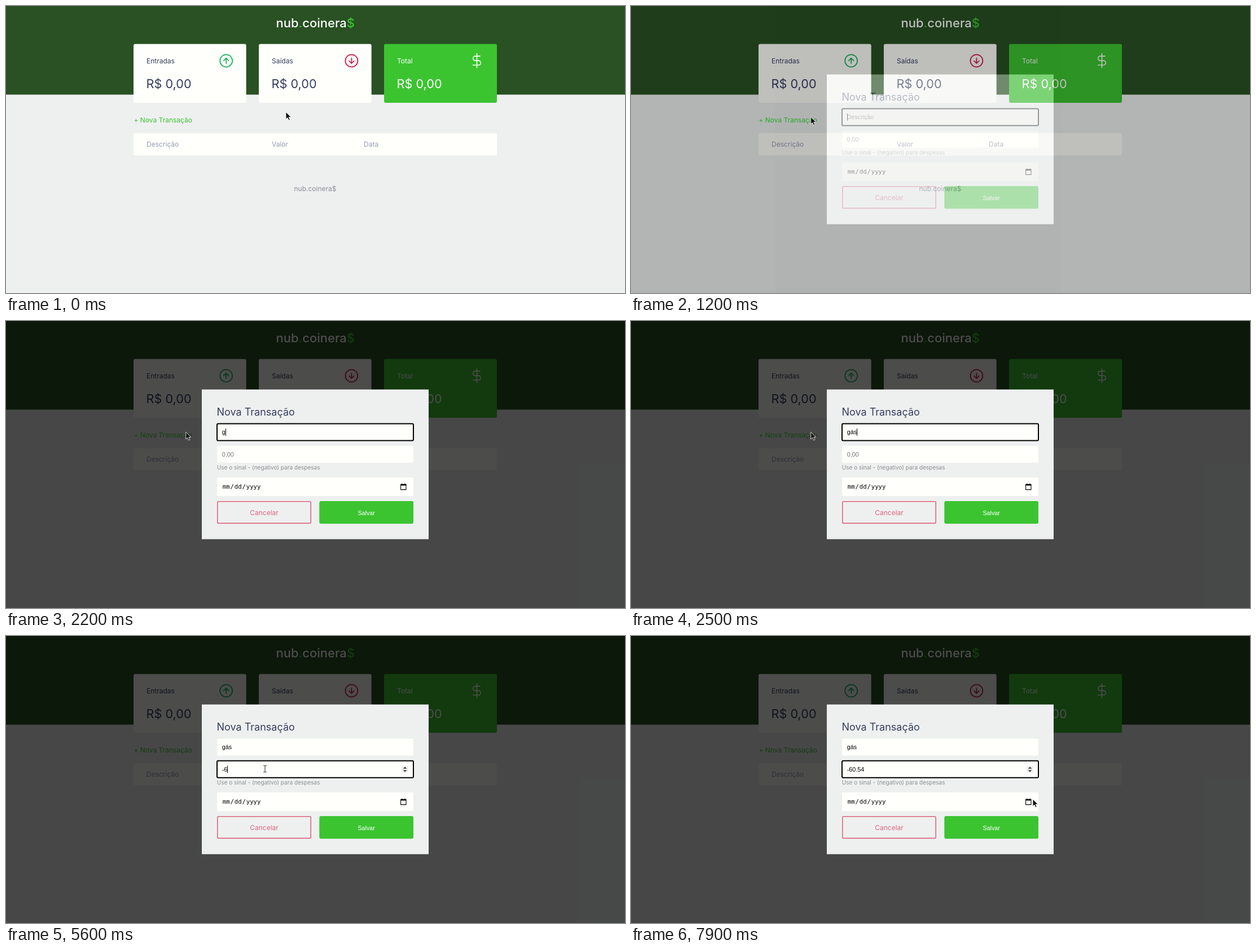
An HTML page that plays this animation: 1097 px wide and 510 px high, repeating every 8000 ms.

```html
<!DOCTYPE html>
<html lang="pt">
<head>
<meta charset="utf-8">
<title>Nova Transação</title>
<style>
  html, body { margin: 0; width: 100%; height: 100%; overflow: hidden; background: #eef0f0; }
  svg { display: block; width: 1097px; height: 510px; }
  text { font: 12px Inter, sans-serif; fill: #363f5f; white-space: pre; }
  .amount { font-size: 21.7px; }
  .brand { font-size: 22px; font-weight: 500; fill: #fff; }
  .brand tspan { fill: #3bc430; }
  .mid { text-anchor: middle; }
  .white { fill: #fff; }
  .grey { fill: #969cb3; }
  .title { font-size: 18px; }
  .help { font-size: 10.05px; fill: #8b9090; }
  .field { font: 10.73px "Liberation Sans", Arial, sans-serif; fill: #000; }
  .hint { fill: #757575; }
  .mono { font: 10.73px "DejaVu Sans Mono", monospace; fill: #000; }
  .card { fill: #fffffb; }
  .green { fill: #3bc430; }
  .line { fill: none; stroke-linecap: round; stroke-linejoin: round; }
</style>
</head>
<body>
<svg viewBox="0 0 1097 510" xmlns="http://www.w3.org/2000/svg">
  <rect width="1097" height="510" fill="#eef0f0"/>
  <rect width="1097" height="157.5" fill="#295123"/>
  <text class="brand mid" x="548.3" y="38">nub<tspan>.</tspan>coinera<tspan>$</tspan></text>

  <rect class="card" x="226" y="67.5" width="199.7" height="104.5" rx="3"/>
  <rect class="card" x="448" y="67.5" width="199.7" height="104.5" rx="3"/>
  <rect class="green" x="670" y="67.5" width="200" height="104.5" rx="3"/>
  <text x="249" y="101.5">Entradas</text>
  <text x="471" y="101.5">Saídas</text>
  <text class="white" x="693" y="101.5">Total</text>
  <text class="amount" x="248.5" y="146">R$ 0,00</text>
  <text class="amount" x="470.5" y="146">R$ 0,00</text>
  <text class="amount white" x="692.5" y="146">R$ 0,00</text>

  <g class="line" stroke-width="1.7">
    <g stroke="#16b45c" transform="translate(390.2 97.3)">
      <circle r="11"/><path d="M0 4.6V-4.6M-4.4-.2L0-4.6 4.4-.2"/>
    </g>
    <g stroke="#d0184b" transform="translate(612.4 97.3)">
      <circle r="11"/><path d="M0-4.6V4.6M-4.4 .2L0 4.6 4.4 .2"/>
    </g>
    <path stroke="#fff" stroke-width="1.4" transform="translate(820.8 83.4) scale(1.14)"
      d="M12 1V23M17 5H9.5a3.5 3.5 0 0 0 0 7h5a3.5 3.5 0 0 1 0 7H6"/>
  </g>

  <text id="link" x="226.5" y="207">+ Nova Transação</text>
  <rect class="card" x="226" y="226" width="644" height="39.5" rx="3"/>
  <text class="grey" x="249" y="249.5">Descrição</text>
  <text class="grey" x="471" y="249.5">Valor</text>
  <text class="grey" x="634" y="249.5">Data</text>
  <text class="mid" x="548" y="328.5" style="fill:#8a8d97">nub.coinera$</text>

  <g id="modal">
    <rect width="1097" height="510" fill="#000" fill-opacity=".7"/>
    <rect x="347" y="121.7" width="402" height="266" fill="#eef0f0"/>
    <text class="title" x="373.5" y="167.5">Nova Transação</text>
    <rect class="card" x="374" y="182.5" width="348" height="30" rx="2"/>
    <rect class="card" x="374" y="221.7" width="348" height="30" rx="2"/>
    <rect class="card" x="374" y="278" width="348" height="33" rx="2"/>
    <rect id="ring" x="374" width="348" height="30" rx="2" fill="none" stroke="#000" stroke-width="2"/>
    <text id="name" class="field" x="382.8" y="201.3"></text>
    <text id="value" class="field" x="382.8" y="240.8"></text>
    <rect id="caret" width="1" height="13"/>
    <g id="spinner">
      <rect x="701" y="231" width="12" height="12" fill="#efefef"/>
      <path fill="#404040" d="M703.6 235.8L707 232.2 710.4 235.8zM703.6 238.2L707 241.8 710.4 238.2z"/>
    </g>
    <text class="help" x="373.7" y="264">Use o sinal - (negativo) para despesas</text>
    <g class="mono">
      <text class="mono" x="383.8" y="298.3">mm</text>
      <text class="mono" x="397.5" y="298.3">/</text>
      <text class="mono" x="404.7" y="298.3">dd</text>
      <text class="mono" x="418.4" y="298.3">/</text>
      <text class="mono" x="425.7" y="298.3">yyyy</text>
    </g>
    <path d="M699.6 290.3H709V299.6H699.6zM701.8 288.8V291M706.8 288.8V291" fill="none" stroke="#000" stroke-width="1.1"/>
    <path d="M699.6 290h9.4v2.4h-9.4z"/>
    <rect x="374.8" y="320.8" width="165.4" height="38.6" rx="2" fill="none" stroke="#dc667f" stroke-width="1.6"/>
    <text class="mid" x="457.5" y="344.6" style="fill:#dc667f">Cancelar</text>
    <rect class="green" x="555.3" y="320" width="166.7" height="40.2" rx="3"/>
    <text class="field mid" x="638.6" y="344.5" style="fill:#fff">Salvar</text>
  </g>

  <path id="arrow" d="M0 0V12.6L3 9.9 5 14.5 7.2 13.5 5.2 9.1H9.2z" fill="#111" stroke="#fff" stroke-width=".8"/>
  <g id="beam" class="line">
    <path d="M-2.5-6Q0-6 0-5Q0-6 2.5-6M0-5V5M-2.5 6Q0 6 0 5Q0 6 2.5 6" stroke="#fff" stroke-width="2.2"/>
    <path d="M-2.5-6Q0-6 0-5Q0-6 2.5-6M0-5V5M-2.5 6Q0 6 0 5Q0 6 2.5 6" stroke="#222" stroke-width="1"/>
  </g>
</svg>
<script>
const LOOP = 8000, STEP = 100;
const el = id => document.getElementById(id);
const [link, modal, ring, nameText, valueText, caret, spinner, arrow, beam] =
  ['link', 'modal', 'ring', 'name', 'value', 'caret', 'spinner', 'arrow', 'beam'].map(el);

// Each track holds [start time, state] pairs; a state lasts until the next one.
const fade = [[0, 0], [1200, .36], [1300, .96], [1400, 1]];
const typedName = [[0, ''], [2200, 'g'], [2300, 'g´'], [2400, 'gá'], [2500, 'gás']];
const typedValue = [[0, ''], [5200, '-'], [5600, '-6'], [6000, '-60'], [7000, '-60.'], [7400, '-60.54']];
const caretOn = [[0, true], [1700, false], [2200, true], [3700, false], [4300, true],
  [4900, false], [5200, true], [6300, false], [7000, true], [7600, false]];
const pointer = [[0, [496, 188.5]], [400, [484, 189]], [600, [470, 190]], [700, [434, 192]],
  [800, [390, 194]], [900, [350, 196]], [1000, [326, 197]], [1100, [318.7, 197.3]],
  [2600, [440, 225]], [2700, [620, 282]], [2800, [714, 300]], [2900, [459, 236]],
  [7400, [480, 256]], [7600, [570, 266]], [7700, [660, 284]], [7800, [716, 298]], [7900, [712, 290]]];
const beamTimes = [[0, false], [2900, true], [7600, false]];

const at = (track, t) => track.findLast(([start]) => start <= t)[1];
const show = (node, on) => node.setAttribute('visibility', on ? 'visible' : 'hidden');

function setField(node, text, hint) {
  node.textContent = text || hint;
  node.classList.toggle('hint', !text);
}

function draw(now) {
  const t = Math.floor(now % LOOP / STEP) * STEP;
  const [x, y] = at(pointer, t);
  const onValue = t >= 3500;
  const active = onValue ? valueText : nameText;
  const typed = at(onValue ? typedValue : typedName, t);

  link.style.fill = t >= 1000 && t < 2600 ? '#33e02f' : '#3bc430';
  modal.setAttribute('opacity', at(fade, t));
  setField(nameText, at(typedName, t), 'Descrição');
  setField(valueText, at(typedValue, t), '0,00');
  ring.setAttribute('y', onValue ? 221.7 : 182.5);
  caret.setAttribute('x', Math.round(382.8 + (typed ? active.getComputedTextLength() : 0)));
  caret.setAttribute('y', onValue ? 230.5 : 191);
  show(caret, at(caretOn, t));
  show(spinner, t >= 2900);

  const isBeam = at(beamTimes, t);
  show(beam, isBeam);
  show(arrow, !isBeam);
  (isBeam ? beam : arrow).setAttribute('transform', `translate(${x} ${y})`);
  requestAnimationFrame(() => draw(performance.now() - origin));
}

const origin = performance.now();
draw(0);
</script>
</body>
</html>
```
